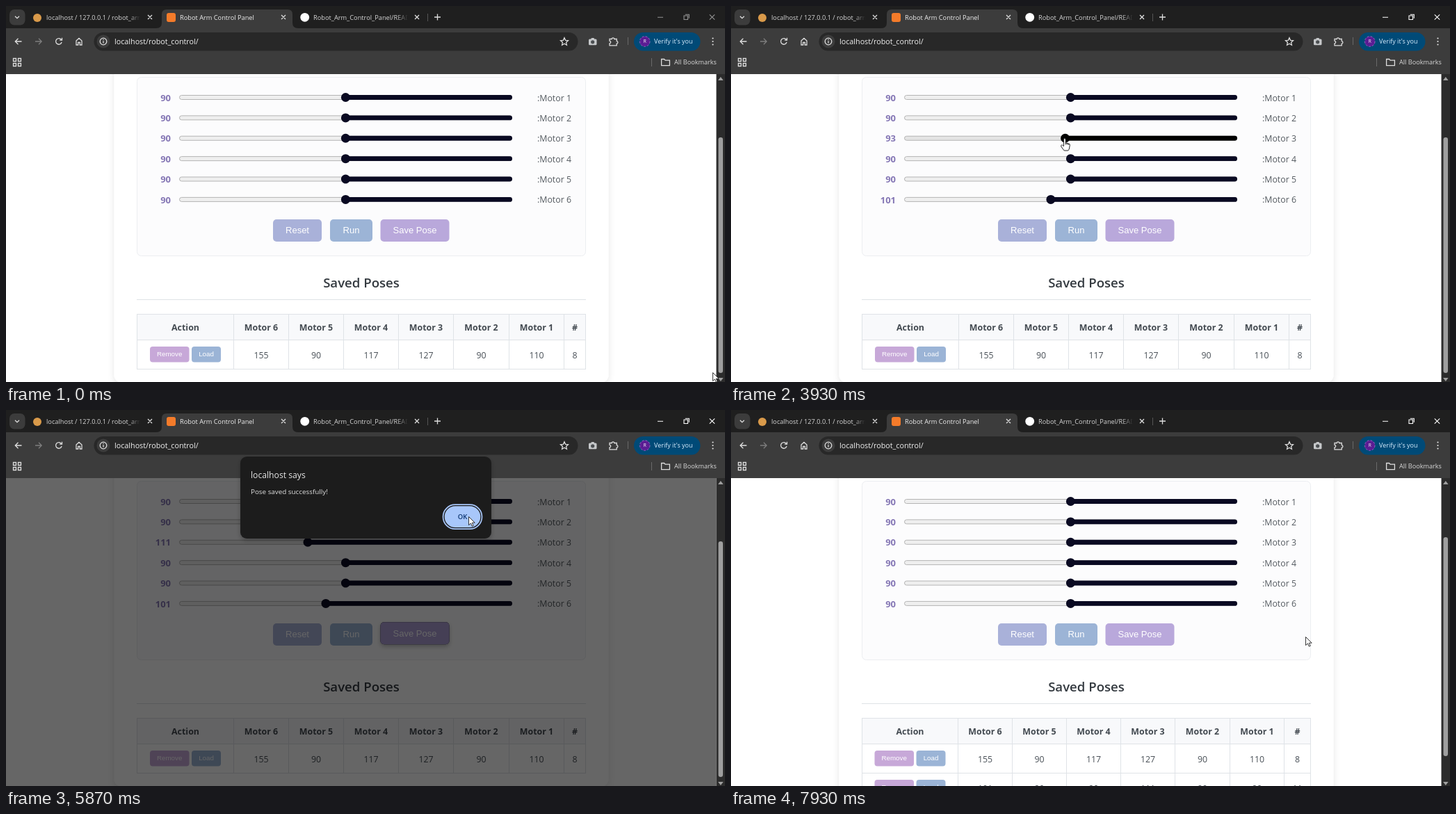
An HTML page for the animation above (8 s loop, 1034 px wide and 541 px high).

```html
<!DOCTYPE html>
<html lang="en">
<head>
<meta charset="utf-8">
<title>Robot Arm Control Panel</title>
<style>
html, body { margin: 0; width: 100%; height: 100%; overflow: hidden; background: #fff; }
svg { display: block; width: 1034px; height: 541px; }
text { font-family: "Open Sans", "Noto Sans", sans-serif; white-space: pre; }
.btn { font-family: "Liberation Sans", Arial, sans-serif; fill: #fff; text-anchor: middle; }
.icon { fill: none; stroke: #dedede; stroke-width: 1.3; }
</style>
</head>
<body>
<svg id="stage" viewBox="0 0 1034 541" xmlns="http://www.w3.org/2000/svg"></svg>
<script>
const LOOP = 8000, STEP = 1000 / 15;
const stage = document.getElementById('stage');
const INK = '#0a0a22';

const rect = (x, y, w, h, fill, r = 0, more = '') =>
  `<rect x="${x}" y="${y}" width="${w}" height="${h}" rx="${r}" fill="${fill}" ${more}/>`;
const text = (x, y, size, fill, str, more = '') =>
  `<text x="${x}" y="${y}" font-size="${size}" fill="${fill}" ${more}>${str}</text>`;
const icon = (d, more = '') => `<path class="icon" d="${d}" ${more}/>`;
const mid = 'text-anchor="middle"', bold = 'font-weight="700"';

const defs = `<defs>
  <linearGradient id="fade"><stop offset="0" stop-color="#1f1f1f" stop-opacity="0"/><stop offset="1" stop-color="#1f1f1f"/></linearGradient>
  <filter id="soft" x="-10%" y="-10%" width="120%" height="120%"><feDropShadow dx="0" dy="3" stdDeviation="5" flood-opacity=".1"/></filter>
  <filter id="drop" x="-20%" y="-30%" width="140%" height="190%"><feDropShadow dx="0" dy="3" stdDeviation="3" flood-opacity=".25"/></filter>
</defs>`;

// Saved poses table
const poses = [[155, 90, 117, 127, 90, 110, 8], [101, 90, 90, 111, 90, 90, 11]];
const heads = ['Action', 'Motor 6', 'Motor 5', 'Motor 4', 'Motor 3', 'Motor 2', 'Motor 1', '#'];

function table(id, rows, first, width) {
  const edges = [188.5, ...Array.from({ length: 7 }, (_, i) => Math.round(first + i * width) + .5), 833.5];
  const center = i => (edges[i] + edges[i + 1]) / 2;
  const bottom = 480.5 + 42 * rows;
  let s = rect(188, 443, 646, 37, '#f8f9fb');
  let lines = `M188 443.5H834M188 480.5H834`;
  edges.forEach(x => lines += `M${x} 443V${bottom}`);
  heads.forEach((h, i) => s += text(center(i), 467, 12.4, '#434a51', h, bold + ' ' + mid));
  for (let r = 0; r < rows; r++) {
    const y = 42 * r, x = center(0) - 51;
    lines += `M188 ${522.5 + y}H834`;
    s += rect(x, 490 + y, 56.5, 22.5, '#c7a8d8', 4) + rect(x + 60, 490 + y, 42, 22.5, '#9bb4d6', 4);
    s += `<text class="btn" x="${x + 28.2}" y="${504.4 + y}" font-size="9.75">Remove</text>`;
    s += `<text class="btn" x="${x + 81}" y="${504.4 + y}" font-size="9.75">Load</text>`;
    poses[r].forEach((v, i) => s += text(center(i + 1), 506.5 + y, 12.35, '#495057', v, mid));
  }
  return `<g id="${id}">${s}<path d="${lines}" stroke="#dfe3e7" fill="none"/></g>`;
}

// Sliders run right to left
const sliderY = i => 131.5 + 29.38 * i;
const sliderX = v => 488.4 - (v - 90) * 2.59;

function slider(i) {
  const y = sliderY(i);
  return text(237, y + 5.2, 13, '#8577b5', 90, `id="val${i}" text-anchor="end" ${bold}`) +
    rect(249.5, y - 3, 478, 6, '#efefef', 3, `id="track${i}" stroke="#b4b4b4"`) +
    rect(488, y - 3.4, 240, 6.8, INK, 3.4, `id="bar${i}"`) +
    `<circle id="knob${i}" cy="${y}" r="6.5"/>` +
    text(813, y + 5, 12.35, '#555b61', ':Motor ' + (i + 1), 'text-anchor="end"');
}

// Hover windows are counted in steps
const buttons = [
  { name: 'Reset', x: 384, w: 70, from: [169, 177, 217], to: [151, 160, 205], hover: [102, 115] },
  { name: 'Run', x: 466, w: 61, from: [156, 180, 214], to: [136, 164, 203], hover: [12, 16] },
  { name: 'Save Pose', x: 538.5, w: 99, from: [185, 168, 219], to: [172, 158, 214], hover: [68, 96.6] }
];
const button = (b, i) => `<g id="btn${i}">` +
  rect(b.x, 307, b.w, 32, '#000', 5, `id="shade${i}" filter="url(#drop)"`) +
  rect(b.x, 307, b.w, 32, '#000', 5, `id="face${i}"`) +
  `<text class="btn" x="${b.x + b.w / 2}" y="327.4" font-size="13">${b.name}</text></g>`;

const page = rect(0, 98, 1034, 443, '#fff') +
  rect(155.5, 40, 711, 501.5, '#fff', 10, 'id="card" filter="url(#soft)"') +
  rect(188.5, 102.5, 645, 257, '#fcfcfd', 6, 'stroke="#eceef1"') +
  poses[0].slice(1).map((_, i) => slider(i)).join('') +
  buttons.map(button).join('') +
  text(511, 405, 18.6, '#343a40', 'Saved Poses', 'font-weight="600" ' + mid) +
  rect(188, 422, 646, 1, '#dee2e6') +
  table('before', 1, 327, 79.1) + table('after', 2, 325.6, 78.2);

const scrollbar = rect(1021.5, 98, 12.5, 443, '#2c2c2c') +
  rect(1024.5, 189, 6.5, 339, '#9f9f9f', 3.2, 'id="thumb"') +
  '<path d="M1024 107l3.8-5 3.8 5zM1024 535l3.8 5 3.8-5z" fill="#9f9f9f"/>';

// Browser frame
const cross = (x, y, r) => `M${x - r} ${y - r}l${2 * r} ${2 * r}m0 ${-2 * r}l${-2 * r} ${2 * r}`;
const cutTitle = (x, end, str) => text(x, 20, 9.24, '#d6d6d6', str) +
  rect(end - 16, 6, 16, 22, 'url(#fade)') + rect(end, 6, 60, 22, '#1f1f1f');

const browser = rect(0, 0, 1034, 33, '#1f1f1f') + rect(0, 32, 1034, 66, '#3c3c3c') +
  rect(5, 5, 22.5, 22.5, '#3c3c3c', 7) + icon('M13 14.7l3 3 3-3') +
  cutTitle(58, 193, 'localhost / 127.0.0.1 / robot_arm') +
  cutTitle(442, 578, 'Robot_Arm_Control_Panel/README.md') +
  '<path d="M216 32q8 0 8-8V12q0-7 7-7h174q7 0 7 7v12q0 8 8 8z" fill="#3c3c3c"/>' +
  text(250, 20, 9.24, '#ededed', 'Robot Arm Control Panel') +
  '<circle cx="45" cy="17" r="6" fill="#d99a4a"/>' +
  rect(231, 10, 13, 13, '#f47b2a', 3) + '<circle cx="429.7" cy="16.3" r="6.4" fill="#fff"/>' +
  icon(cross(207, 16, 3) + cross(399, 16, 3) + cross(591, 16, 3) + 'M616 16h9M620.5 11.5v9') +
  rect(606, 11, 1, 11, '#555') +
  `<g id="controls" fill="none" stroke-width="1.1"><path d="M937 16.2h8M975 14h5.5v5.5h-5.5zM976.800 12.200h5.500v5.500${cross(1015.5, 16, 3.7)}"/></g>` +
  icon('M22.500 51h-9M17.500 46.800l-4.200 4.200 4.200 4.200') +
  icon('M42 51h9M47 46.800l4.200 4.200-4.200 4.200', 'style="stroke:#7d7d7d"') +
  icon('M79.500 48.500a4.300 4.300 0 1 0 .6 3.500M80.500 45.800v3.400h-3.400') +
  icon('M101 50l4-3.700 4 3.700v6h-2.700v-3.500h-2.600V56H101z') +
  rect(126.5, 38, 696, 26.5, '#282828', 13.2) + '<circle cx="140" cy="51" r="9.500" fill="#3c3c3c"/>' +
  icon('M135.200 51a4.800 4.800 0 1 0 9.600 0a4.800 4.800 0 1 0-9.600 0M140 50.300v3.200M140 47.800v1.300') +
  text(156, 55, 10.75, '#f0f0f0', 'localhost/robot_control/') +
  icon('M803 45.700l1.600 3.600 3.900.4-2.900 2.600.8 3.900-3.400-2-3.400 2 .8-3.900-2.900-2.600 3.900-.4z') +
  rect(838, 47.5, 11.5, 8.7, '#c6c8ca', 1.5) + rect(841.5, 46, 4.5, 3, '#c6c8ca', 1) +
  '<circle cx="843.700" cy="51.800" r="2.600" fill="#4b4f52"/>' +
  icon('M868 47.500h3.300a1.700 1.700 0 0 1 3.400 0h3.500v3.200a1.700 1.700 0 0 1 0 3.400v2.700H868v-3a1.700 1.700 0 0 0 0-3.400z') +
  rect(894, 45, 1, 11, '#686868') + rect(903, 38, 95.5, 26.5, '#004a77', 13.2) +
  '<circle cx="918.700" cy="51" r="7.300" fill="#5b1d94" stroke="#b06ad0" stroke-width=".8" stroke-dasharray="3 2"/>' +
  text(918.7, 53.4, 6.5, '#fff', 'R', mid) +
  text(932, 54.4, 9, '#dceeff', 'Verify it\'s you', 'font-weight="500"') +
  [46.5, 51, 55.5].map(y => `<circle cx="1016.500" cy="${y}" r="1.100" fill="#e0e0e0"/>`).join('') +
  icon('M10.500 75.500h4v4h-4zM17.500 75.500h4v4h-4zM10.500 82.500h4v4h-4zM17.500 82.500h4v4h-4z') +
  rect(928, 75, 1, 12, '#6a6a6a') +
  icon('M942.600 76.500h4l1.500 1.700h6.300v7.500h-11.800z') +
  text(961, 84.2, 9.14, '#d8d8d8', 'All Bookmarks');

const dialog = '<g id="dialog">' +
  rect(337, 67, 361, 118, '#1f1f1f', 9, 'filter="url(#drop)"') +
  text(352, 98, 12.2, '#e6e6e6', 'localhost says', 'font-weight="500"') +
  text(352, 121.3, 9.86, '#e0e0e0', 'Pose saved successfully!') +
  rect(628.5, 136.2, 56, 35, 'none', 17.5, 'stroke="#a8c7fa" stroke-width="1.7"') +
  rect(630.7, 138.3, 51.6, 30.8, '#a8c7fa', 15.4) +
  text(656.5, 157.3, 9.5, '#0b3470', 'OK', 'font-weight="600" ' + mid) + '</g>';

const cursor = `<g id="cursor" stroke="#222" stroke-linejoin="round">
  <path id="arrow" fill="#fff" stroke-width=".9" d="M.5.500V12.600l2.900-2.700 1.900 4.300 1.900-.8-1.900-4.200h3.900z"/>
  <path id="hand" fill="#fff" stroke-width="1" d="M-1.600 1a1.400 1.400 0 0 1 2.800 0V6l4.600 1q1.700.5 1.500 2.200l-.8 4.800q-.5 1.800-1.700 3h-5.600q-2.600-2.800-4.400-6q-.7-1.400.6-1.900q1-.3 2 .7l1 1zM1.200 6v2.500M3.300 6.500v2M5.300 7v2"/></g>`;

stage.innerHTML = defs + page + rect(0, 98, 1021.5, 443, '#000', 0, 'id="dim"') +
  scrollbar + browser + dialog + cursor;

const el = {};
stage.querySelectorAll('[id]').forEach(n => el[n.id] = n);
const set = (id, attrs) => { for (const a in attrs) el[id].setAttribute(a, attrs[a]); };
const show = (id, on) => set(id, { display: on ? 'inline' : 'none' });

// Pointer path: step, x, y
const path = [
  [0, 1016, 527], [6, 700, 262], [9, 560, 222], [13, 502, 322], [15, 502, 330], [18, 490, 432],
  [21, 455, 415], [23, 475, 352], [26, 440, 372], [30, 46, 489], [32, 46, 489], [36, 488, 278],
  [39, 488, 278], [43, 460, 274], [44, 460, 274], [48, 803, 262], [52, 489, 202], [54, 489, 202],
  [56, 489, 191], [58, 489, 191], [62, 434, 191], [63, 434, 191], [65, 810, 300], [67, 720, 487],
  [69, 600, 334], [71, 583, 330], [78, 583, 330], [86, 665, 153], [91, 665, 153], [94, 650, 180],
  [96, 595, 318], [98, 528, 293], [104, 425, 322], [108, 420, 328], [114, 420, 328], [119, 826, 326]
];
const clamp = u => Math.max(0, Math.min(1, u));
const ease = u => { u = clamp(u); return u * u * (3 - 2 * u); };

function pointer(k) {
  const i = Math.max(1, path.findIndex(p => p[0] >= k));
  const [a, ax, ay] = path[i - 1], [b, bx, by] = path[i];
  const u = ease((k - a) / (b - a));
  return [ax + (bx - ax) * u, ay + (by - ay) * u];
}

function draw(time) {
  const k = Math.min(119, Math.floor((time + 4) / STEP));
  const [x, y] = pointer(k);
  const modal = k >= 74 && k <= 90;
  const veil = clamp((k - 73) / 4) - clamp((k - 88) / 3);
  const saved = k >= 91;
  let hand = false;

  for (let i = 0; i < 6; i++) {
    const drag = i === 5 ? [39, 11] : i === 2 ? [58, 21] : null;
    const v = drag && k < 111 ? Math.round(90 + drag[1] * ease((k - drag[0]) / 4)) : 90;
    const over = !modal && x > 249 && x < 728 && Math.abs(y - sliderY(i)) < 6.5;
    const kx = sliderX(v), ink = over ? '#000' : INK;
    hand = hand || over;
    el['val' + i].textContent = v;
    set('track' + i, { fill: over ? '#e4e4e4' : '#efefef' });
    set('bar' + i, { x: kx, width: 728 - kx, fill: ink });
    set('knob' + i, { cx: kx, fill: ink });
  }

  buttons.forEach((b, i) => {
    const [on, off] = b.hover;
    const lift = ease((k - on) / 3) - ease((k - off) / 3);
    const color = b.from.map((c, j) => Math.round(c + (b.to[j] - c) * lift));
    if (k >= on && k < off && (k < 79 || k > 94)) hand = true;
    set('btn' + i, { transform: `translate(0 ${-1.8 * lift})` });
    set('face' + i, { fill: `rgb(${color})` });
    set('shade' + i, { opacity: lift });
  });

  show('before', !saved);
  show('after', saved);
  set('card', { height: saved ? 543.5 : 501.5 });
  set('thumb', saved ? { y: 183, height: 315 } : { y: 189, height: 339 });
  set('controls', { stroke: k < 31 ? '#929292' : '#fff' });
  set('dim', { opacity: .6 * veil });
  set('dialog', { opacity: veil });
  show('hand', hand);
  show('arrow', !hand);
  set('cursor', { transform: `translate(${Math.round(x)} ${Math.round(y)})` });
}

const start = performance.now();
function tick() {
  draw((performance.now() - start) % LOOP);
  requestAnimationFrame(tick);
}
tick();
</script>
</body>
</html>
```
